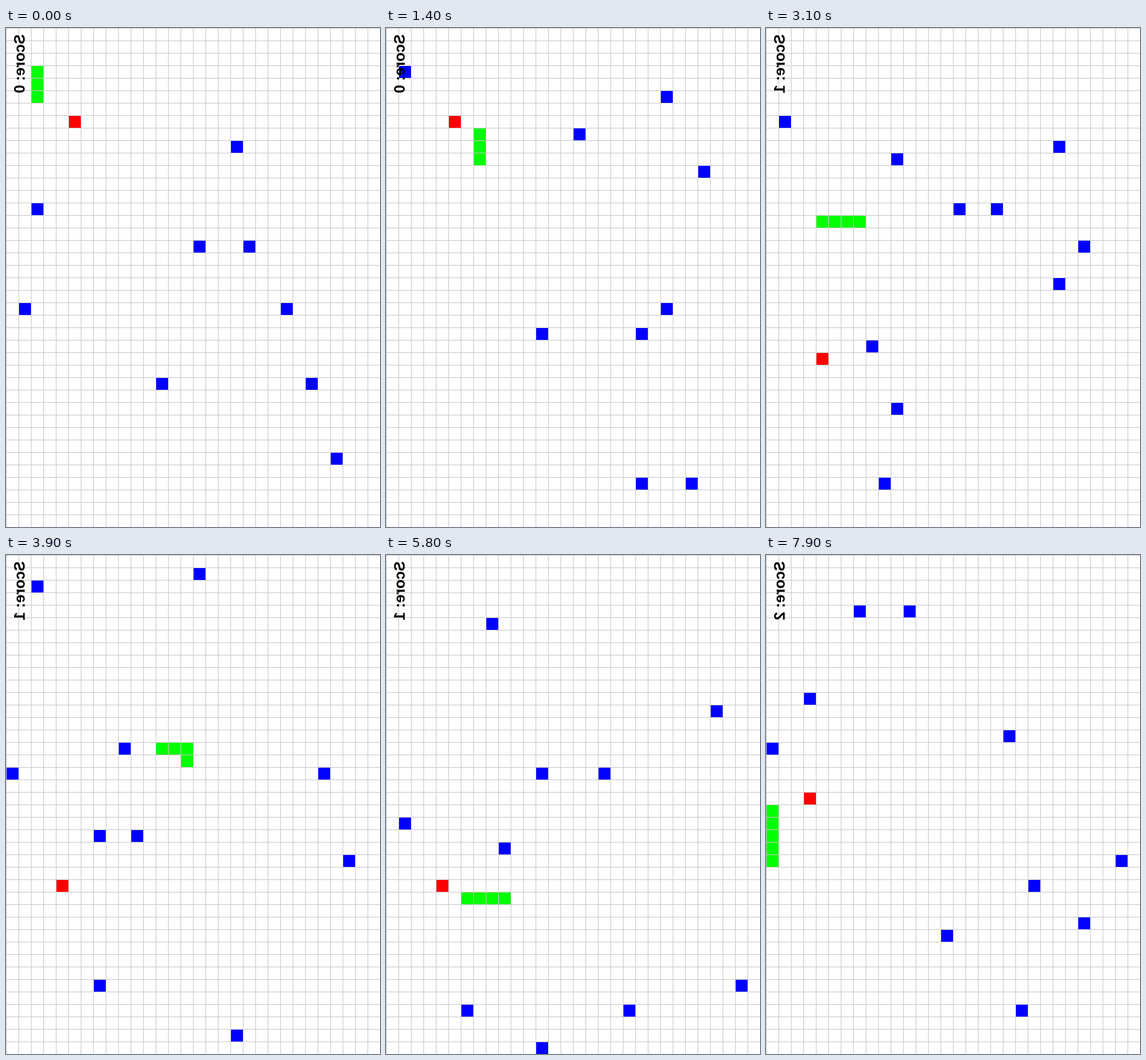
An HTML page with a canvas for the animation above (8000 ms loop, 600 px wide and 800 px high).

```html
<!DOCTYPE html>
<html>
<head>
<meta charset="utf-8">
<style>
html, body { margin: 0; width: 100%; height: 100%; overflow: hidden; background: #fff; }
canvas { display: block; }
</style>
</head>
<body>
<canvas id="stage" width="600" height="800"></canvas>
<script>
const ctx = document.getElementById('stage').getContext('2d');
const CELL = 20, COLS = 30, ROWS = 40, STEP = 100, STEPS = 80;

// Each round starts when food is eaten; blocks are [column, row, signs of dx and dy].
const rounds = [
  { start: 0, food: [5, 7], blocks: [
    [18, 9, '+-'], [2, 14, '--'], [15, 17, '--'], [19, 17, '+-'], [1, 22, '+-'],
    [22, 22, '++'], [12, 28, '++'], [24, 28, '++'], [26, 34, '+-']] },
  { start: 17, food: [4, 26], blocks: [
    [13, 19, '--'], [24, 24, '--'], [26, 6, '+-'], [4, 24, '--'], [29, 0, '-+'],
    [21, 7, '++'], [22, 39, '--'], [11, 31, '+-'], [9, 6, '++'], [5, 32, '--']] },
  { start: 61, food: [3, 19], blocks: [
    [7, 7, '+-'], [3, 8, '-+'], [21, 12, '+-'], [29, 22, '--'], [19, 28, '+-'],
    [26, 18, '+-'], [18, 33, '--'], [2, 18, '++'], [15, 39, '+-'], [16, 36, '-+']] }
];

const corners = [[2, 3], [2, 11], [7, 11], [7, 7], [3, 7], [3, 15],
  [14, 15], [14, 27], [4, 27], [4, 18], [0, 18], [0, 24]];

// Expand the corners into every cell the snake's head visits.
const trail = [corners[0]];
for (const [cx, cy] of corners) {
  let [x, y] = trail[trail.length - 1];
  while (x !== cx || y !== cy) {
    x += Math.sign(cx - x);
    y += Math.sign(cy - y);
    trail.push([x, y]);
  }
}

// Blocks move diagonally and retrace their path at any wall.
function blockAt([x, y, signs], steps) {
  let dx = Number(signs[0] + 1), dy = Number(signs[1] + 1);
  const inside = (v, size) => v >= 0 && v < size;
  while (steps-- > 0) {
    if (!inside(x + dx, COLS) || !inside(y + dy, ROWS)) {
      dx = -dx;
      dy = -dy;
    }
    x += dx;
    y += dy;
  }
  return [x, y];
}

function fillCell([x, y], color) {
  ctx.fillStyle = color;
  ctx.fillRect(x * CELL, y * CELL, CELL, CELL);
}

function drawGrid() {
  ctx.fillStyle = '#c8c8c8';
  for (let x = 0; x < COLS; x++) ctx.fillRect(x * CELL, 0, 1, ROWS * CELL);
  for (let y = 0; y < ROWS; y++) ctx.fillRect(0, y * CELL, COLS * CELL, 1);
}

function drawScore(score) {
  ctx.save();
  ctx.transform(0, 1, 1, 0, 0, 0); // swap the axes
  ctx.font = 'bold 24px "Liberation Sans", Arial, sans-serif';
  ctx.fillStyle = '#000';
  ctx.fillText('Score: ' + score, 10, 30);
  ctx.restore();
}

function draw(step) {
  const score = rounds.filter(r => r.start <= step).length - 1;
  const { start, food, blocks } = rounds[score];
  ctx.fillStyle = '#fff';
  ctx.fillRect(0, 0, COLS * CELL, ROWS * CELL);
  for (const b of blocks) fillCell(blockAt(b, step - start), '#00f');
  fillCell(food, '#f00');
  for (const c of trail.slice(step - score, step + 3)) fillCell(c, '#0f0');
  drawGrid();
  drawScore(score);
}

const origin = performance.now();
function tick() {
  draw(Math.floor((performance.now() - origin) / STEP) % STEPS);
  requestAnimationFrame(tick);
}
tick();
</script>
</body>
</html>
```
